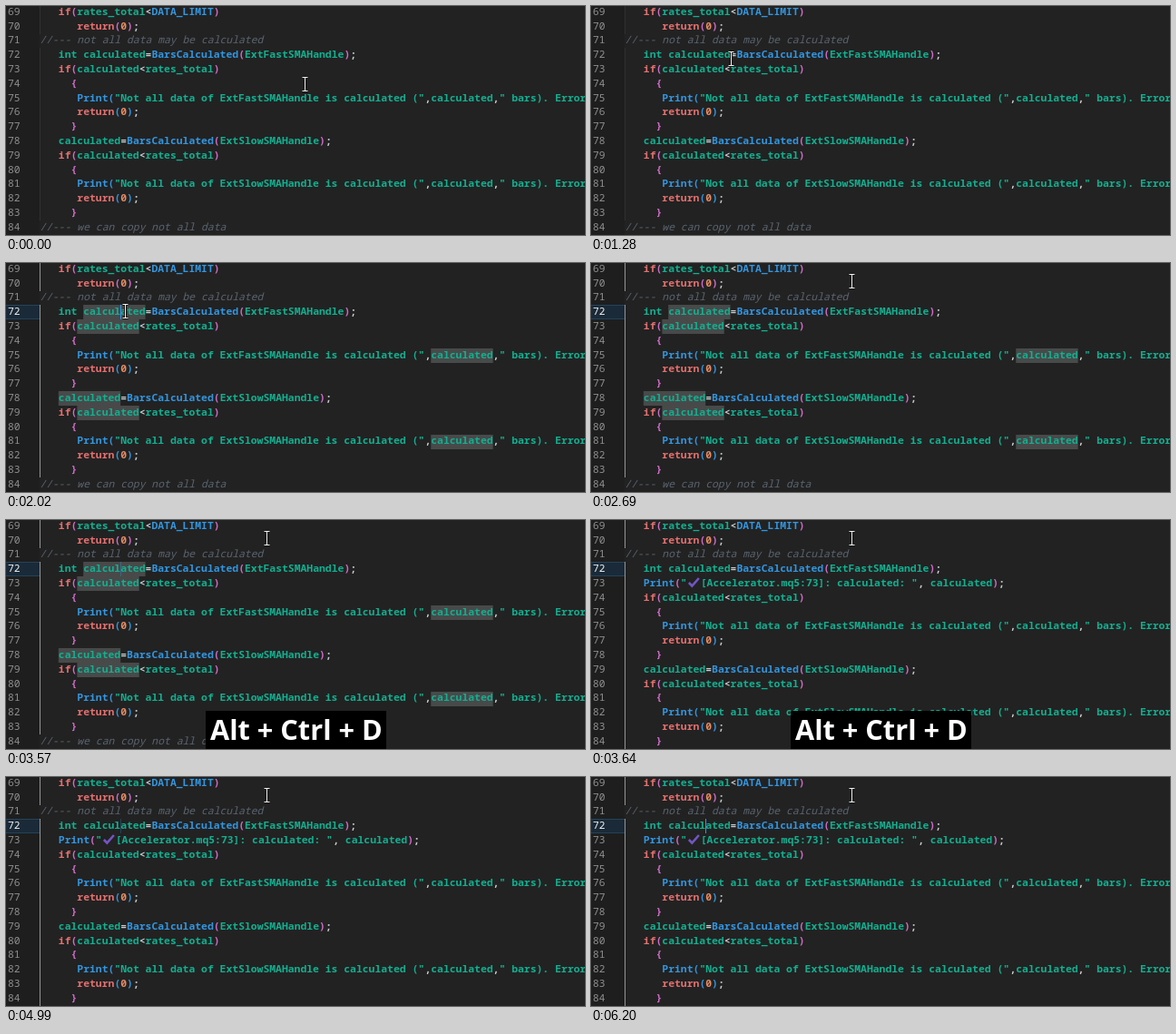
Animation of 638 by 252 pixels, one loop 6.34 s. Source, as an HTML page with a canvas:

```html
<!DOCTYPE html>
<html lang="en">
<head>
<meta charset="utf-8">
<title>Code editor</title>
<style>
html, body { margin: 0; width: 638px; height: 252px; overflow: hidden; background: #222; }
canvas { display: block; }
</style>
</head>
<body>
<canvas id="stage" width="638" height="252"></canvas>
<script>
const ctx = document.getElementById('stage').getContext('2d');
const LOOP = 6340, CLICK = 1750, MARK = 1950, LABEL_ON = 3500, INSERT = 3640, LABEL_OFF = 4520;
const CHAR = 6.84, ROW = 15.8, TOP = -1.1, BASE = 10.9, LEFT = 37.3, FIRST = 69;
const MONO = '11.4px "Noto Sans Mono", "DejaVu Sans Mono", monospace';

const check = name => [
  '   if(calculated<rates_total)',
  '     {',
  `      Print("Not all data of ${name} is calculated (",calculated," bars). Error`,
  '      return(0);',
  '     }'
];
const before = [
  '   if(rates_total<DATA_LIMIT)',
  '      return(0);',
  '//--- not all data may be calculated',
  '   int calculated=BarsCalculated(ExtFastSMAHandle);',
  ...check('ExtFastSMAHandle'),
  '   calculated=BarsCalculated(ExtSlowSMAHandle);',
  ...check('ExtSlowSMAHandle'),
  '//--- we can copy not all data'
];
const after = [...before.slice(0, 4),
  '   Print("✔[Accelerator.mq5:73]: calculated: ", calculated);',
  ...before.slice(4, 15)];

const TOKEN = /\/\/.*|"✔|\[[^"]*"|"[^"]*"?|\w+|\S/g;
const palette = [
  [/^\/\//, '#5a6470'],
  [/^["[]/, '#12b091'],
  [/^(if|return)$/, '#e5706f'],
  [/^\d+$/, '#e58a62'],
  [/^(Print|BarsCalculated|DATA_LIMIT)$/, '#3296e0'],
  [/^\w/, '#12b091'],
  [/^[{}]/, '#d06cc8'],
  [/./, '#c8ccd0']
];
const colorOf = (token, nested) => /^[()]/.test(token)
  ? (nested ? '#3296e0' : '#d06cc8')
  : palette.find(([rule]) => rule.test(token))[1];

function stroke(points, color, width) {
  ctx.strokeStyle = color;
  ctx.lineWidth = width;
  ctx.beginPath();
  points.forEach(([x, y]) => ctx.lineTo(x, y));
  ctx.stroke();
}

function fill(color, x, y, w, h) {
  ctx.fillStyle = color;
  ctx.fillRect(x, y, w, h);
}

function drawLine(text, row, nested, marked) {
  const top = TOP + row * ROW, base = top + BASE;
  let shift = 0;
  for (const { 0: token, index } of text.matchAll(TOKEN)) {
    const x = LEFT + index * CHAR + shift;
    const comment = token.startsWith('//');
    if (marked && token === 'calculated') fill('#484a4a', x, Math.round(top), 10 * CHAR, 16);
    ctx.font = (comment ? 'italic ' : '600 ') + MONO;
    ctx.fillStyle = colorOf(token, nested);
    ctx.fillText(token.replace('✔', ''), x, base);
    if (token.includes('✔')) {
      stroke([[x + 9, base - 4], [x + 12.5, base - 0.5], [x + 20, base - 9]], '#7355c4', 2.6);
      shift = 8.2;
    }
  }
}

function drawEditor(t) {
  const lines = t < INSERT ? before : after;
  const active = t >= CLICK;
  fill('#222222', 0, 0, 638, 252);
  fill('#1e1e1e', 0, 0, 37, 252);
  if (active) {
    fill('#24435a', 0, 46, 37, 16);
    fill('#1a2a38', 0, 47, 37, 14);
  }
  let nested = false;
  lines.forEach((text, row) => {
    if (text[0] === ' ') {
      const y = Math.round(TOP + row * ROW);
      fill(active ? '#949494' : '#303030', 37, y, 1, Math.round(TOP + (row + 1) * ROW) - y);
    }
    ctx.font = '500 ' + MONO;
    ctx.fillStyle = active && row === 3 ? '#f0f0f0' : '#8f8f8f';
    ctx.fillText(FIRST + row, 2, TOP + row * ROW + BASE);
    drawLine(text, row, nested, t >= MARK && t < INSERT);
    if (/^ +[{}]/.test(text)) nested = text.includes('{');
  });
}

const clamp = v => Math.min(1, Math.max(0, v));
const smooth = v => v * v * (3 - 2 * v);

// The caret fades out and in by turns.
const fades = [2400, 2870, 3410, 3890, 4360, 4900, 5360, 5910];
function caretAlpha(t) {
  if (t < CLICK) return 0;
  let alpha = 1;
  fades.forEach((start, i) => {
    if (t < start) return;
    const p = smooth(clamp((t - start) / 270));
    alpha = i % 2 ? p : 1 - p;
  });
  return alpha;
}

const moves = [
  [600, 1280, 154.5, 58, smooth],
  [1280, 1550, 131.5, 53, v => 1 - (1 - v) ** 2],
  [2100, 2690, 287.5, 20, smooth]
];
function pointerAt(t) {
  let x = 329.5, y = 86;
  for (const [start, end, toX, toY, ease] of moves) {
    const p = ease(clamp((t - start) / (end - start)));
    x += (toX - x) * p;
    y += (toY - y) * p;
  }
  return [Math.round(x - 0.5) + 0.5, Math.round(y)];
}

function drawPointer(x, y) {
  for (const [color, width] of [['#151515', 3], ['#f4f4f4', 1]]) {
    stroke([[x, y - 7.5], [x, y + 7.5]], color, width);
    for (const edge of [y - 7.5, y + 7.5])
      stroke([[x - 3, edge], [x + 3, edge]], color, width);
  }
}

function drawLabel() {
  fill('#000', 220, 210, 199, 42);
  ctx.font = '700 30.7px "Open Sans", "Noto Sans", sans-serif';
  ctx.fillStyle = '#fff';
  ctx.fillText('Alt + Ctrl + D', 225, 242.3);
}

function frame(now) {
  const t = now % LOOP;
  drawEditor(t);
  ctx.globalAlpha = caretAlpha(t);
  fill('#3794e8', 126, 46, 1, 16);
  ctx.globalAlpha = 1;
  if (t >= LABEL_ON && t < LABEL_OFF) drawLabel();
  drawPointer(...pointerAt(t));
  requestAnimationFrame(frame);
}
requestAnimationFrame(frame);
</script>
</body>
</html>
```
